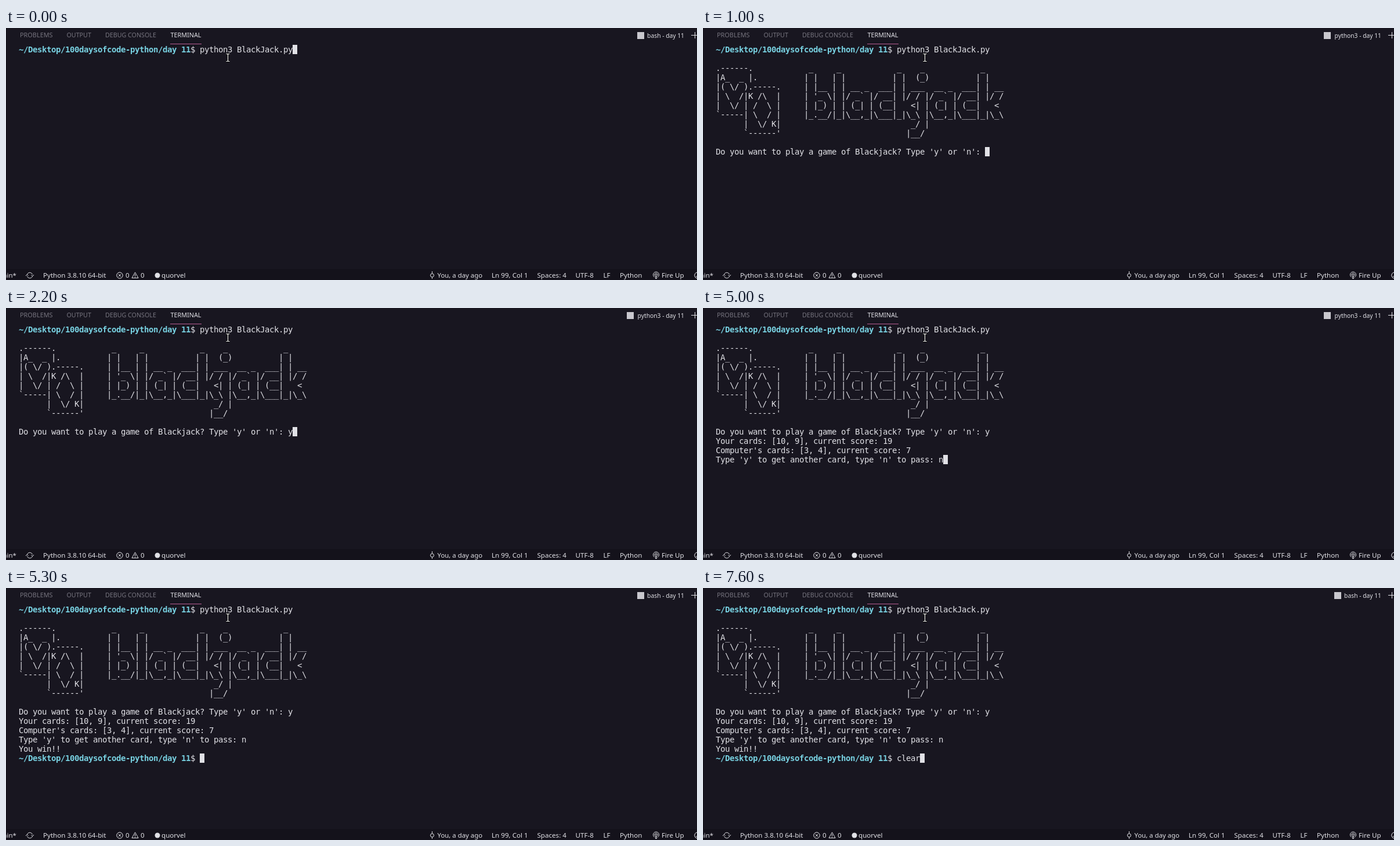
Animation, 1191 px wide and 434 px high, one loop 8 s. Source, as an HTML page with a canvas:

```html
<!DOCTYPE html>
<html lang="en">
<head>
<meta charset="utf-8">
<title>Blackjack in the terminal</title>
<style>
  html, body { margin: 0; width: 100%; height: 100%; overflow: hidden; background: #181620; }
  canvas { display: block; }
</style>
</head>
<body>
<canvas id="stage" width="1191" height="434"></canvas>
<script id="art" type="text/plain">
.------.            _     _            _    _            _
|A_  _ |.          | |   | |          | |  (_)          | |
|( \/ ).-----.     | |__ | | __ _  ___| | ___  __ _  ___| | __
| \  /|K /\  |     | '_ \| |/ _` |/ __| |/ / |/ _` |/ __| |/ /
|  \/ | /  \ |     | |_) | | (_| | (__|   <| | (_| | (__|   <
`-----| \  / |     |_.__/|_|\__,_|\___|_|\_\ |\__,_|\___|_|\_\
      |  \/ K|                            _/ |
      `------'                           |__/
</script>
<script>
const ctx = document.getElementById('stage').getContext('2d');
const art = document.getElementById('art').textContent.split('\n').slice(1, -1);
const W = 1191, H = 434, LOOP = 8000;
const LEFT = 22, TOP = 29, CELL_W = 8, CELL_H = 16;
const FG = '#e1e1e6', MUTED = '#77757f', CYAN = '#78d1e1';
const MONO = '14px "DejaVu Sans Mono", monospace';
const path = '~/Desktop/100daysofcode-python/day 11';
const prompt = path + '$ ';
const run = 'python3 BlackJack.py';

function screenLines(t) {
  const lines = [prompt + run];
  const type = s => { lines[lines.length - 1] += s; };
  if (t >= 800) lines.push('');
  if (t >= 1000) lines.push(...art, '', "Do you want to play a game of Blackjack? Type 'y' or 'n': ");
  if (t >= 2200) type('y');
  if (t >= 2400) lines.push(
    'Your cards: [10, 9], current score: 19',
    "Computer's cards: [3, 4], current score: 7",
    "Type 'y' to get another card, type 'n' to pass: ");
  if (t >= 5000) type('n');
  if (t >= 5300) lines.push('You win!!', prompt);
  if (t >= 7500) type(t < 7600 ? run : 'clear');
  return lines;
}

function rect(x, y, w, h, color) {
  ctx.fillStyle = color;
  ctx.fillRect(x, y, w, h);
}

function label(text, x, y, size, color = FG, align = 'left') {
  ctx.font = `${size}px "Noto Sans", "Open Sans", sans-serif`;
  ctx.fillStyle = color;
  ctx.textAlign = align;
  ctx.fillText(text, x, y);
}

function stroke(d, color = FG, width = 1) {
  ctx.strokeStyle = color;
  ctx.lineWidth = width;
  ctx.stroke(new Path2D(d));
}

function arc(x, y, r, from = 0, to = 2 * Math.PI) {
  ctx.strokeStyle = FG;
  ctx.lineWidth = 1;
  ctx.beginPath();
  ctx.arc(x, y, r, from, to);
  ctx.stroke();
}

function dot(x, y, r) {
  ctx.fillStyle = FG;
  ctx.beginPath();
  ctx.arc(x, y, r, 0, 2 * Math.PI);
  ctx.fill();
}

function drawTerminal(lines) {
  ctx.textAlign = 'left';
  lines.forEach((line, row) => {
    const pathEnd = line.startsWith(path) ? path.length : 0;
    [...line].forEach((ch, col) => {
      const inPath = col < pathEnd;
      ctx.font = (inPath ? 'bold ' : '') + MONO;
      ctx.fillStyle = inPath ? CYAN : FG;
      ctx.fillText(ch, LEFT + col * CELL_W, TOP + row * CELL_H + 13);
    });
  });
  const last = lines.length - 1;
  rect(LEFT + lines[last].length * CELL_W, TOP + last * CELL_H, CELL_W, CELL_H, FG);
}

function drawTabs(playing) {
  label('PROBLEMS', 24, 16, 10.9, MUTED);
  label('OUTPUT', 104.5, 16, 10.7, MUTED);
  label('DEBUG CONSOLE', 171, 16, 10.7, MUTED);
  label('TERMINAL', 283.5, 16, 10.8);
  rect(283, 27, 54, 1, '#b85d93');
  label(playing ? 'python3 - day 11' : 'bash - day 11', 1169, 17, 10.3, FG, 'right');
  rect(playing ? 1070 : 1088, 7, 12, 12, '#c9c8ce');
  stroke('M1181 12.5H1191M1187.5 7V18');
}

function drawStatusBar() {
  rect(0, 415, W, H - 415, '#14121b');
  const text = (s, x, align) => label(s, x, 430, 11.6, FG, align);
  text('main*', 18, 'right');

  arc(41, 426, 4.8, Math.PI * 1.08, Math.PI * 1.9);
  arc(41, 426, 4.8, Math.PI * 0.08, Math.PI * 0.9);
  stroke('M43.5 425.5L45.8 427.5L48 425M34 427L36.2 424.5L38.5 426.5');
  text('Python 3.8.10 64-bit', 64);

  arc(196, 426, 5.2);
  stroke('M193.7 423.7L198.3 428.3M198.3 423.7L193.7 428.3');
  text('0', 206);
  stroke('M222.5 420.8L228 430.5H217Z M222.5 424V427.5M222.5 428.3V429.5');
  text('0', 232);

  dot(261, 426, 4.5);
  text('quorvel', 268);

  arc(734.5, 426, 3);
  stroke('M734.5 419V423M734.5 429V432');
  label('You, a day ago', 743.5, 430, 11.4);
  text('Ln 99, Col 1', 837);
  text('Spaces: 4', 915.5);
  text('UTF-8', 981.5);
  text('LF', 1029.5);
  text('Python', 1058);

  arc(1120.5, 425, 5, Math.PI * 0.7, Math.PI * 2.3);
  arc(1120.5, 425, 2.7, Math.PI * 0.75, Math.PI * 2.25);
  dot(1120.5, 425, 1.1);
  stroke('M1119.5 431.5V427.5H1121.5V431.5Z');
  text('Fire Up', 1130);

  arc(1192, 426, 5.2);
  stroke('M1188.5 429.5L1195.5 422.5');
}

function drawPointer() {
  const beam = 'M379.5 44.5H381.5L382.5 45.5L383.5 44.5H385.5M382.5 45V57M379.5 57.5H381.5L382.5 56.5L383.5 57.5H385.5';
  stroke(beam, '#000', 3);
  stroke(beam, '#fff', 1.2);
}

function draw(t) {
  rect(0, 0, W, H, '#181620');
  rect(0, 0, 1, 415, '#100e16');
  drawTabs(t >= 1000 && t < 5300);
  drawTerminal(screenLines(t));
  drawStatusBar();
  drawPointer();
}

const start = performance.now();
function tick() {
  draw((performance.now() - start) % LOOP);
  requestAnimationFrame(tick);
}
tick();
</script>
</body>
</html>
```
